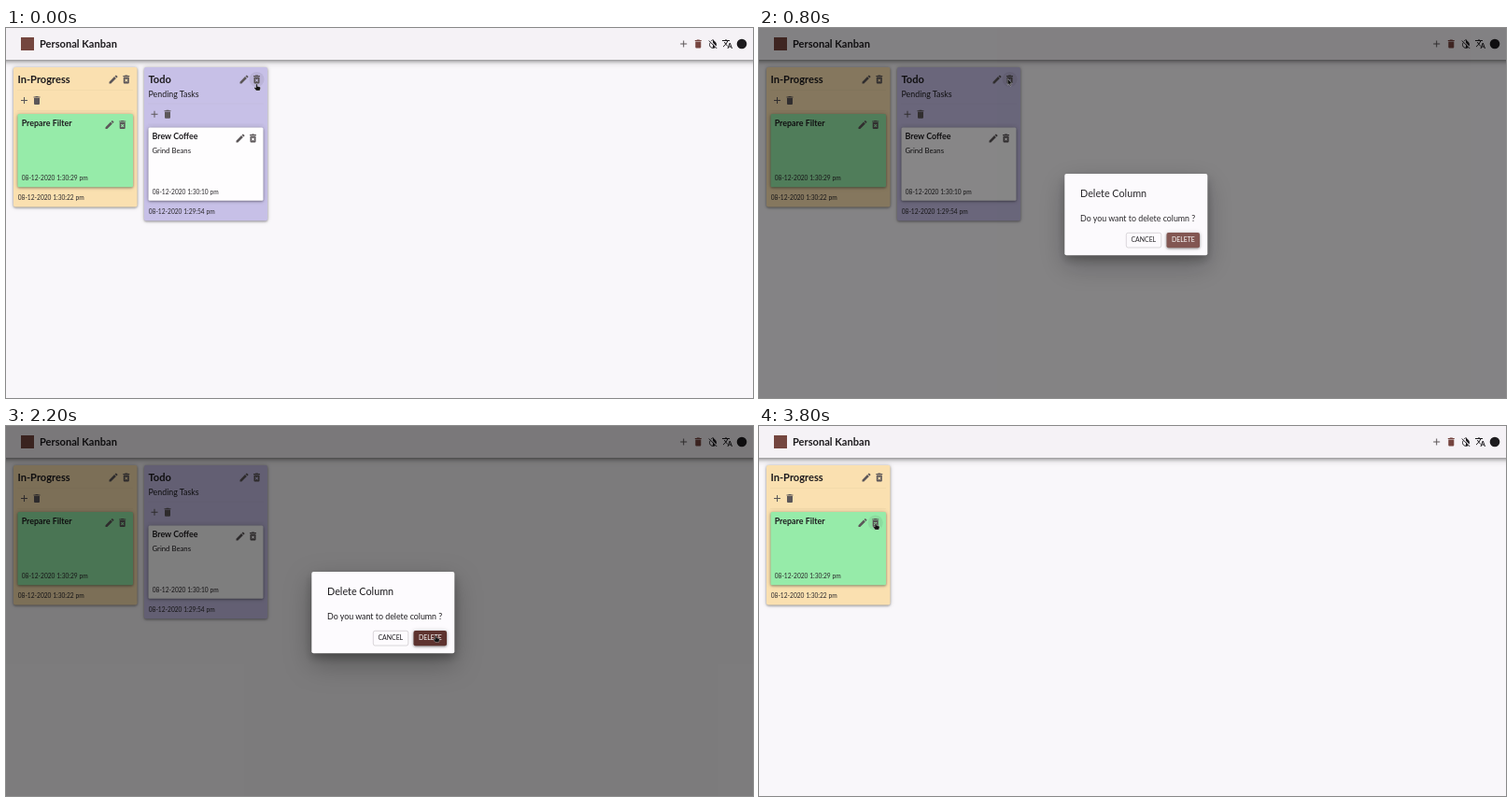
Recreate the animation shown at these times as an HTML page. Size 800 by 396 pixels, loop 3.9 s.

```html
<!DOCTYPE html>
<html lang="en">
<head>
<meta charset="utf-8">
<title>Kanban board</title>
<style>
  html, body { margin: 0; width: 100%; height: 100%; overflow: hidden; background: #f9f7fa; }
  svg { display: block; font-family: Lato, Nunito, sans-serif; fill: #1d1b1e; }
  .title { font-weight: 700; font-size: 11.1px; }
  .name { font-weight: 700; font-size: 8.9px; }
  .text { font-size: 8.85px; }
  .note { font-size: 7.75px; }
  .date { font-size: 6.65px; fill: #2b292c; }
  .head { font-size: 10.8px; }
  .label { font-size: 6.9px; }
  .icon { fill: #5c5759; }
  .line { stroke: #000; stroke-opacity: .05; stroke-width: .6; }
  .paper { filter: drop-shadow(0 1px 1px #0005) drop-shadow(0 .5px 2px #0003); }
  .bar { filter: drop-shadow(0 1px 2px #0006) drop-shadow(0 2px 3px #0003); }
  .popup { filter: drop-shadow(0 5px 5px #0004) drop-shadow(0 10px 14px #0004); }
</style>
</head>
<body>
<svg width="800" height="396" viewBox="0 0 800 396">
  <defs>
    <symbol id="add" viewBox="0 0 24 24"><path d="M19 13h-6v6h-2v-6H5v-2h6V5h2v6h6z"/></symbol>
    <symbol id="edit" viewBox="0 0 24 24"><path d="M3 17.25V21h3.75L17.8 9.94l-3.75-3.75zM20.7 7.04q.7-.7 0-1.41l-2.34-2.34q-.7-.7-1.41 0l-1.83 1.83 3.75 3.75z"/></symbol>
    <symbol id="bin" viewBox="0 0 24 24"><path d="M6 19q0 2 2 2h8q2 0 2-2V7H6zM19 4h-3.5l-1-1h-5l-1 1H5v2h14z"/></symbol>
    <symbol id="remove" viewBox="0 0 24 24"><path fill-rule="evenodd" d="M6 19q0 2 2 2h8q2 0 2-2V7H6zM19 4h-3.5l-1-1h-5l-1 1H5v2h14zM8.5 11.9l1.4-1.4 2.1 2.1 2.1-2.1 1.4 1.4-2.1 2.1 2.1 2.1-1.4 1.4-2.1-2.1-2.1 2.1-1.4-1.4 2.1-2.1z"/></symbol>
    <symbol id="invert" viewBox="0 0 24 24">
      <path d="M12 2.3v7.4l7.2 7.2c1.4-3 .9-6.5-1.6-9zM12 12v9.6q3 0 5-1.8z"/>
      <path d="M8.5 6.2l3.5-3.6M6.5 9.2C3 14 6 20.600 12 20.600M3.600 5.100l16.800 16.800" fill="none" stroke="#1d1b1e" stroke-width="2"/>
    </symbol>
    <symbol id="translate" viewBox="0 0 24 24">
      <path d="M1 5h16M9 2v3M13 5Q11 12 3 18.300M5.700 8Q8 13 12.500 16.400M13 22l4.500-12 4.500 12M14.500 18h6" fill="none" stroke="#1d1b1e" stroke-width="2"/>
    </symbol>
    <clipPath id="buttonShape"><rect x="436.500" y="219" width="35.500" height="16.300" rx="2"/></clipPath>
  </defs>

  <rect width="800" height="396" fill="#f9f7fa"/>
  <rect class="bar" x="-8" y="-8" width="816" height="42" fill="#f5f2f6"/>
  <rect x="16" y="10" width="14" height="14" fill="#74463f"/>
  <text class="title" x="36" y="20.500">Personal Kanban</text>
  <g class="icon">
    <use href="#add" x="719.700" y="11" width="12" height="12"/>
    <use href="#bin" x="735.300" y="11" width="12" height="12" fill="#75443f"/>
  </g>
  <use href="#invert" x="751" y="11" width="12" height="12"/>
  <use href="#translate" x="766.500" y="11" width="12" height="12"/>
  <circle cx="788" cy="17" r="5.300"/>

  <g>
    <rect class="paper" x="8" y="42" width="132.500" height="149.500" rx="2" fill="#fae0b0"/>
    <text class="title" x="12.500" y="58.500">In-Progress</text>
    <path class="line" d="M12 66.500h124M12 88.500h124"/>
    <rect class="paper" x="12.500" y="92" width="123.500" height="78.300" rx="1.500" fill="#96eba9"/>
    <text class="name" x="16.700" y="104.500">Prepare Filter</text>
    <text class="date" x="16.700" y="162.700">08-12-2020 1:30:29 pm</text>
    <text class="date" x="12.700" y="184.300">08-12-2020 1:30:22 pm</text>
    <g class="icon">
      <use href="#edit" x="109" y="49" width="12" height="12"/>
      <use href="#remove" x="122.800" y="49" width="12" height="12"/>
      <use href="#add" x="13.500" y="71.500" width="12" height="12"/>
      <use href="#bin" x="27" y="71.500" width="12" height="12"/>
      <use href="#edit" x="105" y="97.500" width="12" height="12"/>
      <use href="#remove" x="118.700" y="97.500" width="12" height="12"/>
    </g>
  </g>

  <g id="todo">
    <rect class="paper" x="148" y="42" width="132" height="164.300" rx="2" fill="#c7c0e7"/>
    <text class="title" x="152.500" y="58.500">Todo</text>
    <text class="text" x="152.500" y="74.300">Pending Tasks</text>
    <path class="line" d="M152 81h124M152 103h124"/>
    <rect class="paper" x="152.500" y="106.500" width="123" height="78.300" rx="1.500" fill="#fefdfe"/>
    <text class="name" x="156.500" y="119.300">Brew Coffee</text>
    <text class="note" x="156.500" y="133.500">Grind Beans</text>
    <text class="date" x="156.700" y="177.500">08-12-2020 1:30:10 pm</text>
    <text class="date" x="152.700" y="199">08-12-2020 1:29:54 pm</text>
    <g class="icon">
      <use href="#edit" x="249" y="49" width="12" height="12"/>
      <use href="#remove" x="262.500" y="49" width="12" height="12"/>
      <use href="#add" x="153" y="86.300" width="12" height="12"/>
      <use href="#bin" x="167" y="86.300" width="12" height="12"/>
      <use href="#edit" x="245" y="112" width="12" height="12"/>
      <use href="#remove" x="258.500" y="112" width="12" height="12"/>
    </g>
  </g>
  <circle id="halo" r="8" fill-opacity=".07"/>

  <g id="modal">
    <rect width="800" height="396" fill="#000" fill-opacity=".5"/>
    <rect class="popup" x="327.300" y="156" width="153" height="87.300" rx="2" fill="#fdfbfe"/>
    <text class="head" x="344" y="180.500">Delete Column</text>
    <text class="text" x="344" y="207">Do you want to delete column ?</text>
    <rect x="393.300" y="219.300" width="37.500" height="15.700" rx="2" fill="none" stroke="#c9c5c9" stroke-width=".7"/>
    <text class="label" x="398.500" y="229.300">CANCEL</text>
    <rect id="button" class="paper" x="436.500" y="219" width="35.500" height="16.300" rx="2"/>
    <circle id="ripple" cx="463" cy="228" r="16" fill="#fff" fill-opacity=".27" clip-path="url(#buttonShape)"/>
    <text class="label" x="442" y="229.300" fill="#fff">DELETE</text>
  </g>

  <g id="cursor" fill="#111" stroke="#fff" stroke-opacity=".6" stroke-width=".5">
    <path id="arrow" d="M0 0v6.800l1.500-1.300 1.200 2.500 1.100-.5-1.200-2.400h2.200z"/>
    <path id="hand" d="M-.8 3.500V.5Q0-.7.8.5V2.400l2.400.6q.9.300.8 1.500L3.300 7H-.5L-2.700 4.200q0-1.200 1.900-.2z"/>
  </g>
</svg>
<script>
const LOOP = 3900, STEP = 100;
const el = id => document.getElementById(id);
const show = (id, on) => el(id).setAttribute("visibility", on ? "visible" : "hidden");
const clamp = x => Math.min(1, Math.max(0, x));
const smooth = x => x * x * x * (x * (6 * x - 15) + 10);
const ramp = (t, start, end) => smooth(clamp((t - start) / (end - start)));

// Each stop is time, x, y of the pointer's hot spot.
const stops = [
  [0, 268.5, 60], [600, 266.3, 54.3], [1000, 266.3, 54.3], [1600, 460, 224],
  [2100, 460, 224], [2500, 462.8, 227.5], [2900, 462.8, 227.5], [3600, 125, 104], [LOOP, 125, 104]
];

function pointer(t) {
  const i = stops.findIndex(s => s[0] > t);
  const [t0, x0, y0] = stops[i - 1], [t1, x1, y1] = stops[i];
  const k = ramp(t, t0, t1);
  return [x0 + (x1 - x0) * k, y0 + (y1 - y0) * k];
}

function draw(t) {
  const deleted = t >= 2800;
  const overButton = t >= 1500 && t < 2600;
  const isHand = t < 700 || overButton || t >= 3500;

  show("todo", !deleted);
  el("modal").setAttribute("opacity", deleted ? 0 : ramp(t, 633, 843));
  el("button").setAttribute("fill", t >= 1700 && !deleted ? (t < 1800 ? "#70423e" : "#5e332f") : "#7b4c47");
  show("ripple", t >= 2700 && !deleted);

  show("halo", t < 1200 || t >= 3500);
  el("halo").setAttribute("transform", deleted ? "translate(124.7 103.5)" : "translate(268.5 55)");

  el("cursor").setAttribute("transform", `translate(${pointer(t)})`);
  show("hand", isHand);
  show("arrow", !isHand);
}

function tick() {
  const t = performance.now() % LOOP;
  draw(Math.floor(t / STEP) * STEP);
  requestAnimationFrame(tick);
}
tick();
</script>
</body>
</html>
```
